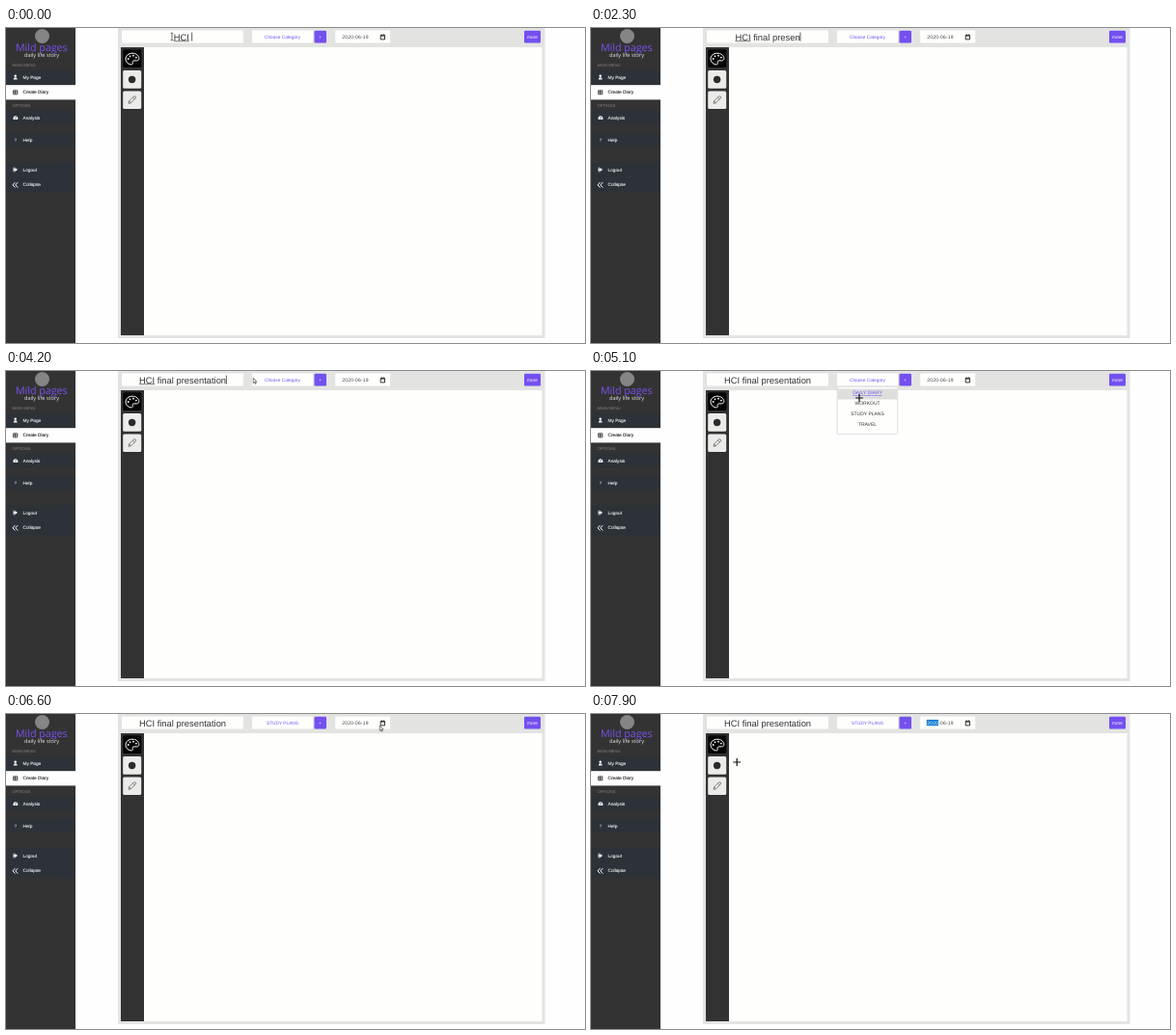
Write an HTML page that moves like this. It is 600x327 px and loops after 8 s.

```html
<!DOCTYPE html>
<html lang="en">
<head>
<meta charset="utf-8">
<title>Diary editor</title>
<style>
  html, body { margin: 0; width: 100%; height: 100%; overflow: hidden; background: #fefefe; }
  svg { display: block; width: 600px; height: 327px; }
  text { font: 4.75px "Liberation Sans", Arial, sans-serif; text-rendering: geometricPrecision; white-space: pre; }
  .mid { text-anchor: middle; }
  .brand { font: 10.7px "Open Sans", sans-serif; fill: #7a50ee; }
  .tag { font: 5.6px "Open Sans", sans-serif; fill: #e6e6e6; }
  .head { font-size: 4.2px; fill: #858585; }
  .menu { fill: #f4f4f4; stroke: #f4f4f4; stroke-width: .1; }
  .menu.on { fill: #222; stroke: #222; }
  .purple { fill: #7450f0; }
  .item { font-size: 5px; fill: #333; }
  .item.hover { fill: #7450f0; text-decoration: underline; }
  .date { font-size: 5px; letter-spacing: .2px; fill: #444; }
  #title { font-size: 9.4px; fill: #333; }
  .line { fill: none; stroke: #fff; stroke-width: 1; }
</style>
</head>
<body>
<svg viewBox="0 0 600 327">
  <rect width="600" height="327" fill="#fefefe"/>

  <!-- sidebar -->
  <rect width="72" height="327" fill="#343334"/>
  <circle cx="37.5" cy="8.5" r="7.5" fill="#858585"/>
  <text class="brand mid" x="36.8" y="24">Mild pages</text>
  <text class="tag mid" x="37" y="29.5">daily life story</text>
  <text class="head" x="6.5" y="40">MAIN MENU</text>
  <text class="head" x="6.5" y="81.5">OPTIONS</text>
  <g id="menu"></g>
  <g fill="#f4f4f4">
    <circle cx="9.7" cy="49.8" r="1.3"/>
    <path d="M7.7 53.5q0-2.3 2-2.3t2 2.3z"/>
    <path d="M7.6 95a2.5 2.7 0 1 1 4.6 0z"/>
    <path d="M9.6 94.3l1.1-2.4" stroke="#2c3237" stroke-width=".6"/>
    <text class="mid" x="9.8" y="117.8" font-weight="bold">?</text>
    <path d="M9.4 146.2v-1.2l2.6 2.1-2.6 2.1v-1.2h-1.5v-1.8z"/>
  </g>
  <path d="M9.4 145.1h-1.6v4h1.6" class="line" style="stroke-width:.6"/>
  <path d="M9.4 160.2l-2.4 2.7 2.4 2.7M12.2 160.2l-2.4 2.7 2.4 2.7" class="line"/>
  <path d="M7.6 64.8h4.2v4h-4.2zM7.6 66.7h4.2M9.5 65v3.8" fill="none" stroke="#222" stroke-width=".8"/>

  <!-- editor panel -->
  <rect x="116" width="442.5" height="322" fill="#e3e3e2"/>
  <rect x="143" y="20" width="412.5" height="299" fill="#fefefd"/>
  <rect x="119" y="20" width="24" height="299" fill="#333233"/>
  <g fill="#fefefd">
    <rect x="120" y="2.5" width="126" height="13" rx="1"/>
    <rect x="255" y="2.5" width="63" height="13" rx="1"/>
    <rect x="341.2" y="2.5" width="57" height="13" rx="1"/>
  </g>
  <g class="purple">
    <rect x="319.5" y="2.8" width="12.5" height="12.7" rx="1.2"/>
    <rect x="537" y="2.8" width="17" height="12.7" rx="1.2"/>
  </g>
  <text class="mid" x="325.7" y="10.7" fill="#fff">+</text>
  <text class="mid" x="545.5" y="10.8" fill="#fff">more</text>
  <text class="purple mid" id="category" x="286.5" y="10.8"></text>

  <rect id="mark" x="347.8" y="5.9" width="12.3" height="6.2" fill="#0877d5"/>
  <text class="date" x="348.2" y="10.9"><tspan id="year">2020</tspan>-06-19</text>
  <path d="M388.2 7.6h4.3v4.3h-4.3zM388 8h4.7M389.2 6.4v1M391.5 6.4v1" fill="none" stroke="#222" stroke-width=".9"/>

  <!-- drawing tools -->
  <rect x="121.2" y="22.3" width="19.2" height="18.7" rx="1.5" fill="#050505"/>
  <path class="line" d="M131 26.2c-4.2 0-7 2.6-7 6s2.900 5.700 5.700 5.700c1.700 0 2-1 1.500-2s.2-2 1.600-2h2.600c1.500 0 2.400-.9 2.400-2.200 0-3.100-3-5.500-6.800-5.500z"/>
  <g fill="#fff">
    <circle cx="126.700" cy="32" r=".9"/><circle cx="128.500" cy="29.300" r=".9"/>
    <circle cx="132" cy="28.700" r=".9"/><circle cx="134.900" cy="30.600" r=".9"/>
  </g>
  <g fill="#ebebea">
    <rect x="121.2" y="44" width="19" height="18.700" rx="1.500"/>
    <rect x="121.2" y="65.500" width="19" height="18.500" rx="1.500"/>
  </g>
  <circle cx="130.600" cy="53.500" r="3.700" fill="#2b2b2b"/>
  <path d="M127 78.300l.6-2.500 4.800-4.800q1-.7 1.800.1t.1 1.800l-4.800 4.800zM131.400 72l1.900 1.900M127.600 75.800l1.900 1.900" fill="none" stroke="#555" stroke-width=".7"/>

  <!-- moving parts -->
  <text id="title" y="12.600"></text>
  <path id="spell" d="M0 13.700h16.200" stroke="#444" stroke-width=".7"/>
  <path id="caret" d="M0 4.600v9" stroke="#333" stroke-width=".8"/>
  <g id="drop">
    <rect x="255.200" y="16.200" width="62.500" height="49.200" rx=".8" fill="#fefefd" stroke="#ccc" stroke-width=".6"/>
    <rect id="row" x="255.400" width="62.200" height="11" fill="#dededd"/>
    <g id="items"></g>
  </g>
  <g id="status">
    <rect y="323" width="200" height="4" fill="#d8e5ea"/>
    <text x="1" y="326.600" style="font-size:3.900px" fill="#444">https://localhost/diary/write/category/select?name=study-plans</text>
  </g>
  <g id="mouse">
    <path id="beam" d="M-1.300-3.700h2.600M0-3.700v7.400M-1.300 3.700h2.600" fill="none" stroke="#333" stroke-width=".7"/>
    <path id="arrow" d="M0 0v5.200l1.200-1 .8 1.900.9-.4-.8-1.800h1.500z" fill="#fff" stroke="#222" stroke-width=".6"/>
    <path id="cross" d="M-3.900 0h7.800M0-3.900v7.800" fill="none" stroke="#111" stroke-width="1.200"/>
  </g>
</svg>
<script>
  const $ = id => document.getElementById(id);
  const show = (id, on) => { $(id).style.display = on ? '' : 'none'; };

  const menu = [['My Page', 51.3], ['Create Diary', 66.8], ['Analysis', 93], ['Help', 116], ['Logout', 147], ['Collapse', 162.8]];
  $('menu').innerHTML = menu.map(([name, y], i) =>
    `<rect y="${y - 7.6}" width="72" height="15.2" fill="${i === 1 ? '#fefefe' : '#2c3237'}"/>` +
    `<text class="menu${i === 1 ? ' on' : ''}" x="17.5" y="${y + 1.6}">${name}</text>`).join('');

  const choices = ['DAILY DIARY', 'WORKOUT', 'STUDY PLANS', 'TRAVEL'];
  $('items').innerHTML = choices.map((name, i) =>
    `<text class="item mid" x="286.5" y="${24 + i * 11}">${name}</text>`).join('');
  const items = [...$('items').children];

  // one time per character typed after the opening word
  const full = 'HCI final presentation', start = 4;
  const keys = [300, 500, 800, 900, 1000, 1200, 1400, 1500, 1700, 1800, 2000, 2100, 2600, 2700, 2800, 2900, 3000, 3200];
  const OPEN = 4500, PICK = 5900, DATE = 6700, LOOP = 8000;

  // pointer stops: time, x, y
  const path = [
    [0, 172, 9], [3900, 172, 9], [4000, 150, 9], [4200, 256.3, 7.3], [4300, 264, 9], [4700, 264, 9],
    [4900, 274, 20], [5300, 282, 36], [5500, 282, 42], [5600, 282, 44], [5900, 282, 44],
    [6100, 370, 70], [6300, 445, 101], [6400, 430, 82], [6500, 402, 34], [6600, 387.3, 12],
    [7000, 387.3, 12], [7200, 392, 42], [7300, 394.5, 62], [7600, 394.5, 62],
    [7700, 407, 101], [7800, 270, 18], [7900, 151.2, 50], [8000, 151.2, 50]
  ];

  function pointer(t) {
    const n = path.findIndex(p => p[0] > t);
    const [t0, x0, y0] = path[n - 1], [t1, x1, y1] = path[n];
    const k = (t - t0) / (t1 - t0);
    return [x0 + (x1 - x0) * k, y0 + (y1 - y0) * k];
  }

  function drawTitle(t) {
    const typed = keys.filter(k => k <= t);
    const title = $('title');
    title.textContent = full.slice(0, start + typed.length);
    const width = title.getComputedTextLength(), x = 183 - width / 2;
    title.setAttribute('x', x);
    $('spell').setAttribute('transform', `translate(${x})`);
    $('caret').setAttribute('transform', `translate(${x + width + .3})`);
    const last = typed.length ? typed[typed.length - 1] : 0;
    show('spell', t < OPEN);
    show('caret', t < OPEN && (t - last) % 1000 < 500);
  }

  function drawMenu(t, x, y) {
    const open = t >= OPEN && t < PICK;
    const row = open && y > 18.5 ? Math.floor((y - 18.5) / 11) : -1;
    show('drop', open);
    show('row', row >= 0);
    $('row').setAttribute('y', 18.5 + Math.max(row, 0) * 11);
    items.forEach((el, i) => el.classList.toggle('hover', i === row));
    show('status', t >= 5500 && t < 6100);
    $('category').textContent = t < PICK ? 'Choose Category' : choices[2];
  }

  function drawPointer(t, x, y) {
    const kind = y > 16 ? 'cross' : x < 246 ? 'beam' : 'arrow';
    for (const id of ['beam', 'arrow', 'cross']) show(id, id === kind);
    show('mouse', t < keys[0] || t >= 3700);
    $('mouse').setAttribute('transform', `translate(${x} ${y})`);
  }

  function frame(now) {
    const t = Math.floor(now % LOOP / 100) * 100;
    const [x, y] = pointer(t);
    drawTitle(t);
    drawMenu(t, x, y);
    drawPointer(t, x, y);
    show('mark', t >= DATE);
    $('year').style.fill = t >= DATE ? '#fff' : '';
    requestAnimationFrame(tick);
  }

  let begin;
  function tick(now) {
    begin ??= now;
    frame(now - begin);
  }
  frame(0);
</script>
</body>
</html>
```
